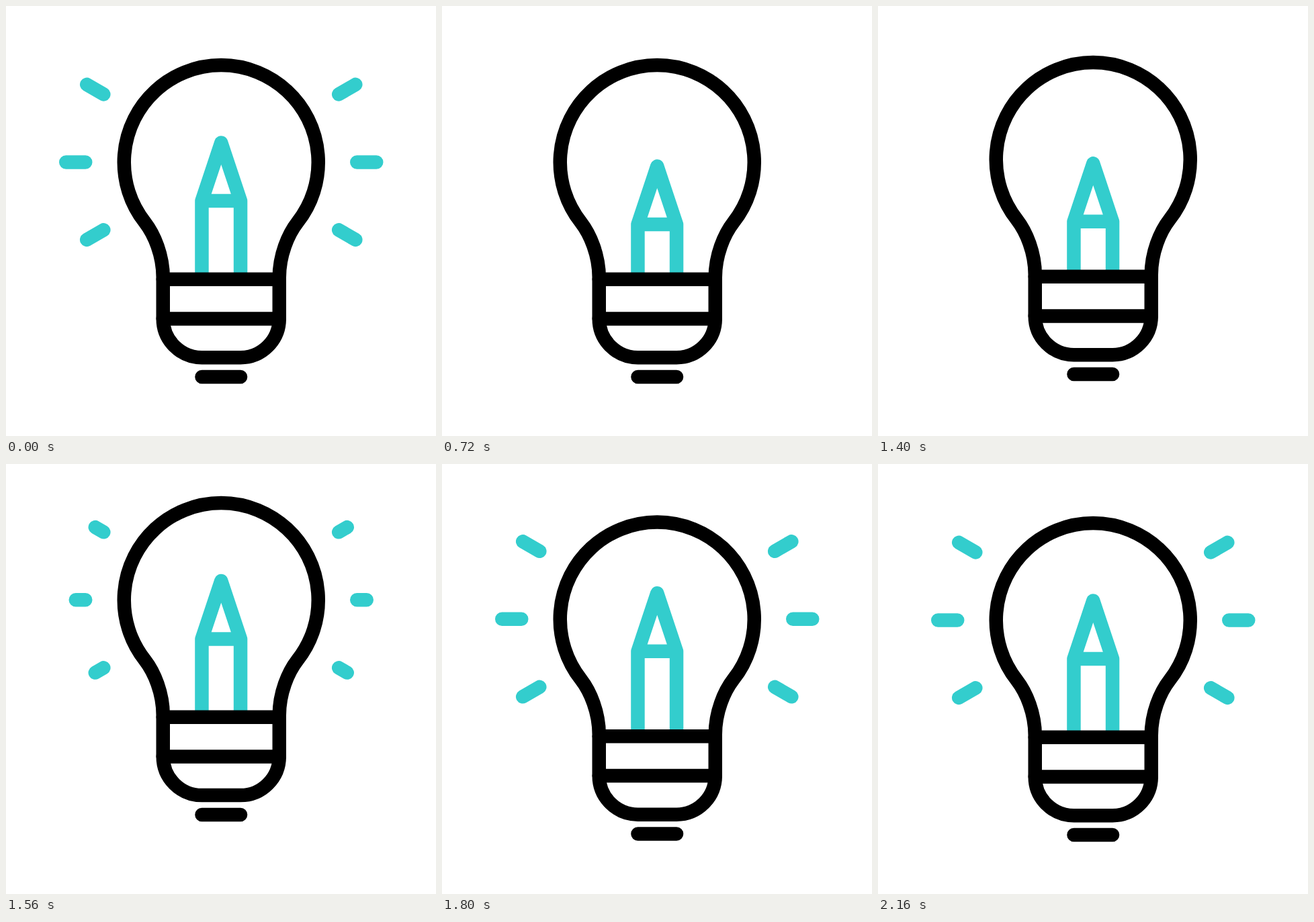
Recreate the animation shown at these times as an HTML page. Size 640 px wide and 640 px high, loop 2280 ms.

```html
<!DOCTYPE html>
<html lang="en">
<head>
<meta charset="utf-8">
<title>Idea bulb</title>
<style>
  html, body { margin: 0; height: 100%; overflow: hidden; background: #fff; }
  svg { display: block; width: 100%; height: 100%; }
  path { fill: none; stroke: #000; stroke-width: 20.5; stroke-linecap: round; stroke-linejoin: round; }
  .teal { stroke: #33cdcd; }
</style>
</head>
<body>
<svg viewBox="0 0 640 640">
  <clipPath id="glass"><rect width="640" height="407"/></clipPath>
  <g id="bulb">
    <path id="rays" class="teal"/>
    <g clip-path="url(#glass)">
      <path id="pencil" class="teal" d="M291.2 520V290L320 203.5L348.8 290V520M291.2 290H348.8"/>
    </g>
    <path d="M233.5 404C233.5 371 220.5 340 206.5 322A144.5 144.5 0 1 1 433.5 322C419.5 340 406.5 371 406.5 404V465.5A57.7 57.7 0 0 1 348.8 523.2H291.2A57.7 57.7 0 0 1 233.5 465.5Z"/>
    <path d="M233.5 406.8H406.5M233.5 465.5H406.5M291.2 552H348.8"/>
  </g>
</svg>
<script>
const LOOP = 2280, STEP = 40;
const $ = id => document.getElementById(id);

// Progress from 0 to 1 between two times, linear or eased at both ends.
const ramp = (t, from, to) => Math.min(1, Math.max(0, (t - from) / (to - from)));
const half = u => (2 * u) ** 2.8 / 2;
function ease(t, from, to) {
  const u = ramp(t, from, to);
  return u < 0.5 ? half(u) : 1 - half(1 - u);
}

// Six rays around the glass, 30 degrees apart on each side, growing outwards.
function rayPath(length) {
  if (length <= 0) return "";
  let d = "";
  for (const side of [-1, 1]) {
    for (const turn of [-1, 0, 1]) {
      const a = turn * Math.PI / 6;
      const point = r => `${320 + side * r * Math.cos(a)} ${232.4 + r * Math.sin(a)}`;
      d += `M${point(202)}L${point(202 + 29 * length)}`;
    }
  }
  return d;
}

function draw(t) {
  const hop = -30.5 * ease(t, 1310, 1600) + 32.5 * ease(t, 1600, 1882) - 2 * ease(t, 1882, 2160);
  const slide = 37 * ease(t, 160, 880) + 3 * ease(t, 1120, 1270)
    - 50 * ease(t, 1270, 1728) + 10 * ease(t, 1728, 2160);
  const glow = 1 - ramp(t, 360, 680) + ramp(t, 1400, 1720);

  $("bulb").setAttribute("transform", `translate(0.25 ${hop})`);
  $("pencil").setAttribute("transform", `translate(0 ${slide})`);
  $("rays").setAttribute("d", rayPath(glow));
}

const start = performance.now();
function tick() {
  const t = (performance.now() - start) % LOOP;
  draw(Math.floor(t / STEP) * STEP);
  requestAnimationFrame(tick);
}
tick();
</script>
</body>
</html>
```
